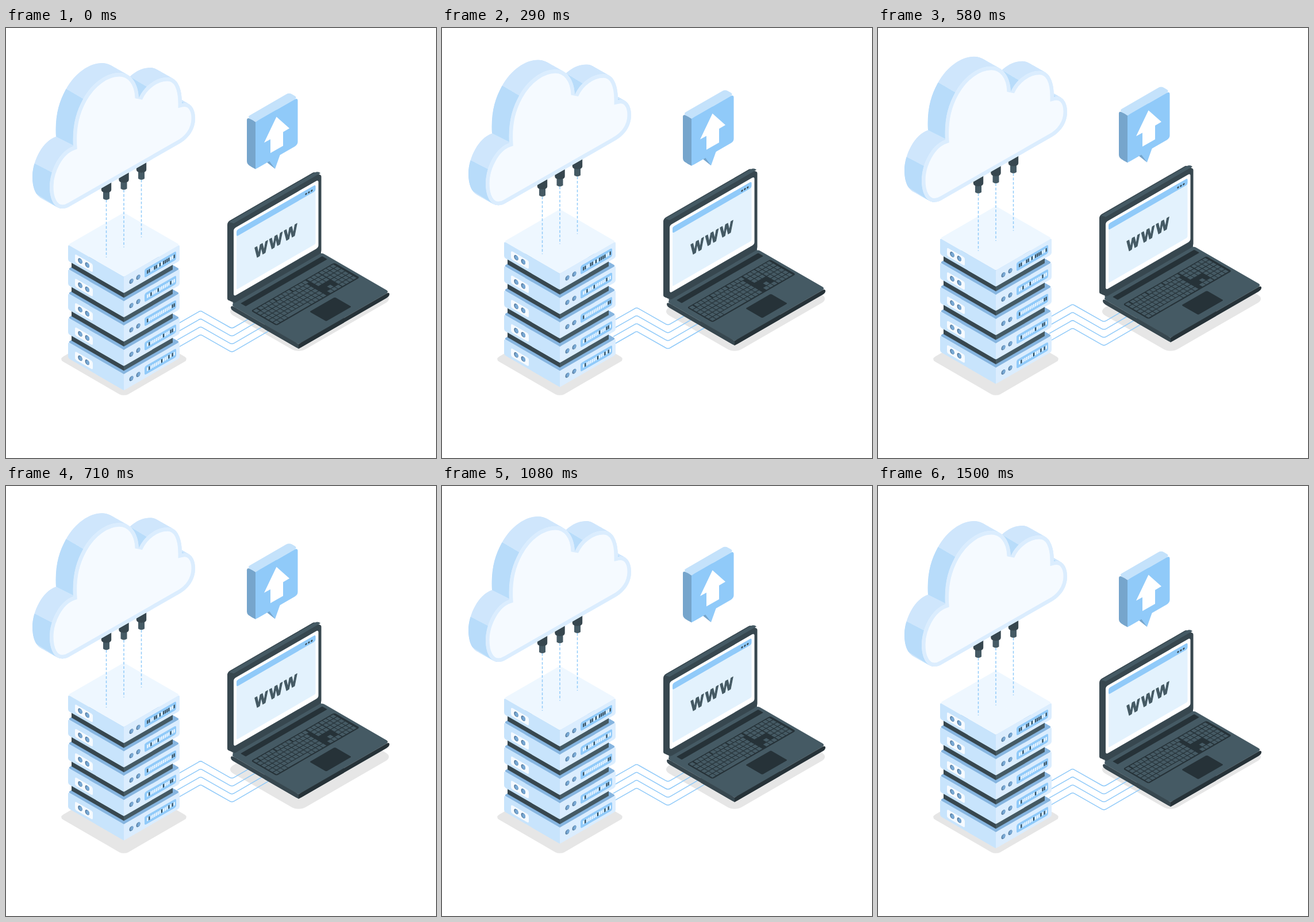
Write an HTML page that moves like this. It is 748x748 px and loops after 1.54 s.

```html
<!DOCTYPE html>
<html lang="en">
<head>
<meta charset="utf-8">
<title>Cloud hosting</title>
<style>
  html, body { margin: 0; width: 100%; height: 100%; overflow: hidden; background: #fff; }
  svg { display: block; width: 100%; height: 100%; }
</style>
</head>
<body>
<svg id="stage" viewBox="0 0 748 748"></svg>
<script>
const LOOP = 1540, STEPS = 37, FPS = 24;
const FLOAT = 1500, LIFT = 14.5;
const ISO = Math.tan(Math.PI / 6);
const BLUE = '#90caf9', INK = '#263238', DARK = '#37474f', SLATE = '#455a64', PALE = '#f5faff';

const repeat = (n, fn) => Array.from({ length: n }, (_, i) => fn(i)).join('');
const move = (x, y, body) => `<g transform="translate(${x} ${y})">${body}</g>`;
const rect = (x, y, w, h, fill, r = 0) =>
  `<rect x="${x}" y="${y}" width="${w}" height="${h}" rx="${r}" fill="${fill}"/>`;
const path = (d, fill, extra = '') => `<path d="${d}" fill="${fill}" ${extra}/>`;
const line = (d, extra = '') => path(d, 'none', `stroke="${BLUE}" stroke-width="1.5" ${extra}`);

// The three isometric planes, each with its origin at the plane's left corner.
const plane = (a, b, c, d) => (x, y, body) =>
  `<g transform="matrix(${a} ${b} ${c} ${d} ${x} ${y})">${body}</g>`;
const leftSide = plane(1, ISO, 0, 1);
const rightSide = plane(1, -ISO, 0, 1);
const floor = plane(1, -ISO, 1, ISO);

// Block whose front top corner is x,y; a and b are its widths to the left and right.
function box(x, y, a, b, h, colors, r) {
  const [top, left, right] = colors, lx = x - a, ly = y - a * ISO;
  return floor(lx, ly, rect(0, 0, b, a, top, r) + rect(0, a / 2, b / 2, a / 2, top)) +
    leftSide(lx, ly, rect(0, 0, a, h, left, r) + rect(a / 2, 0, a / 2, h, left)) +
    rightSide(x, y, rect(0, 0, b, h, right, r) + rect(0, 0, b / 2, h, right));
}

// Repeatable pseudo-random number from 0 to 1.
const noise = n => Math.abs(Math.sin(n * 127.1 + 3) * 4375.85) % 1;

function shadows() {
  return floor(91.5, 576, rect(0, 0, 113.5, 113.5, '#e6e6e6', 8)) +
    floor(383, 493, rect(0, 0, 164, 126, '#e6e6e6', 12));
}

function cloud() {
  const face = 'M98 314C84 314 76 298 76 276C76 249 93 214 117 206C115 170 122 146 134 124' +
    'C150 95 175 78 197 78C216 78 230 94 231 122C240 102 260 86 281 86C298 86 306 104 306 131' +
    'C319 128 329 138 329 157C329 177 317 193 300 202L112 309.5Q105 314 98 314Z';
  const body = repeat(61, i => move(-i / 2, -i * 0.283, path(face, 'currentColor')));
  return `<defs>
      <clipPath id="rim">${path(face, '#000')}</clipPath>
      <clipPath id="shade">
        <path d="M70 86L150 133L140 215L86 188H70ZM40 231L90 257L100 318L40 280Z
          M217 86L262 113L232 135ZM290 118L318 137L306 142Z"/>
      </clipPath>
      <g id="body">${body}</g>
    </defs>
    <use href="#body" color="#cfe6fc"/>
    <g clip-path="url(#shade)"><use href="#body" color="#b8dcfa"/></g>` +
    path(face, PALE, 'stroke="#dbedfe" stroke-width="13" clip-path="url(#rim)"');
}

function cable(i) {
  const x = 174.5 + i * 30.5, y = 299 - i * 17.5;
  return line(`M${x} ${y}v100`, 'stroke-dasharray="4.6 3"') +
    move(x, y,
      path('M-5.500 -16v14q5.500 4 11 0v-14z', SLATE) +
      path('M-8.700 -40v22q0 3 3.200 4.500q5.500 2 11 0q3.200 -1.500 3.200 -4.500v-22z', DARK));
}

function knob(x, y, r) {
  return `<ellipse cx="${x}" cy="${y}" rx="${r * 0.87}" ry="${r}" fill="#547ba0"/>
    <ellipse cx="${x + 0.8}" cy="${y}" rx="${r * 0.66}" ry="${r * 0.82}" fill="#78a9d5"/>`;
}

function server(i) {
  const colors = [i ? '#86b5e0' : '#eef7ff', '#c8e4fc', '#dbedfe'];
  const lights = repeat(16, n => {
    const lit = noise(i * 16 + n) > (i ? 0.25 : 0.6);
    return rect(40.2 + n * 3.1, 12, 2, 6, lit ? PALE : DARK);
  });
  // the dark spacer stands on the roof of every unit but the topmost
  const spacer = leftSide(114, 361.5, rect(0, 0, 91, 13, DARK)) +
    rightSide(205, 414, rect(0, 0, 85, 13, SLATE));
  return move(0, i * 42.3,
    box(205, 433, 97, 97, 28, colors, 3) +
    (i ? spacer : '') +
    leftSide(108, 377, rect(12, 9, 31, 14.5, PALE, 3) + knob(21, 16, 4.3) + knob(33.3, 16, 4.3)) +
    rightSide(205, 433, knob(13, 15, 4) + knob(25, 15, 4) + rect(36, 7.5, 55, 15, BLUE, 3) + lights));
}

function wires() {
  return repeat(4, i => move(0, i * 13.8,
    line('M298 515L334 494.500Q338 491 342 493.800L389 520.500Q393 523 397 520.500L458 485')));
}

// Keys lie on a grid of 21 by 6 cells: letters, arrows, number pad.
function keyboard() {
  const cellW = 6.75, cellH = 7;
  const key = (col, row, span = 1) =>
    rect(col * cellW + 0.5, row * cellH + 0.6, span * cellW - 1, cellH - 1.2, SLATE);
  const row = r => {
    const gap = r ? 0 : 0.2;
    const letters = r < 5
      ? repeat(13, c => key(0.1 + c + gap * Math.ceil(c / 4), r))
      : repeat(3, c => key(0.1 + c, r)) + key(3.1, r, 6) + repeat(4, c => key(9.1 + c, r));
    const arrows = repeat(3, c => r < 3 || r === 5 || (r === 4 && c === 1) ? key(14 + c, r) : '');
    const pad = repeat(4, c => key(17.1 + c * 0.95, r, 0.95));
    return letters + arrows + pad;
  };
  return rect(-1, -1, 145, 44.5, INK, 3) + repeat(6, row);
}

function lid() {
  const slab = repeat(11, i => rightSide(385 + i, 337.5 + i * 0.45, rect(0, 0, 153.5, 138, DARK, 5)));
  const edge = path('M388 337.500L537 251.500Q543 248.500 547 252.500L396 340Z', SLATE);
  const dots = repeat(3, i => `<circle cx="${127 + i * 4.9}" cy="20" r="1.6" fill="${DARK}"/>`);
  const label = `<text transform="translate(38 81) scale(.866 1)" fill="${SLATE}" stroke="${SLATE}"
    stroke-width="1.6" stroke-linejoin="round" letter-spacing="4" font-size="27" font-weight="700"
    font-family="'Liberation Sans', Arial, sans-serif">WWW</text>`;
  return slab + edge + rightSide(395, 342,
    rect(1, 7.6, 147.5, 118, '#fff', 4) + rect(6, 14, 137.5, 102.5, '#e3f2fd', 2) +
    rect(6, 13.3, 137.5, 11, BLUE, 3) + dots + label);
}

function laptop() {
  return box(509, 550, 118, 158, 8, [SLATE, DARK, INK], 5) +
    path('M394 478L548 388V400L400 488Z', SLATE) +
    floor(408, 479, rect(0, 0, 142, 9, INK, 1)) +
    floor(428, 492, keyboard()) +
    floor(528, 493.5, rect(0, 0, 44, 29, INK, 2)) +
    lid();
}

function bubble() {
  return path('M453 233L460 228L468 245Z', '#76a5cc') +
    path('M457 230L478 217L468 245Z', BLUE) +
    box(434, 163.5, 15, 73.5, 82, ['#c4e2fb', '#76a5cc', BLUE], 5) +
    path('M470.500 154.500L493 174.500L482 181V205L460 217.500V193.500L449 199.500Z', '#fff');
}

const stage = document.getElementById('stage');
stage.innerHTML = shadows() + '<g id="scene">' + wires() + repeat(5, i => server(4 - i)) +
  repeat(3, cable) + cloud() + laptop() + bubble() + '</g>';
const scene = document.getElementById('scene');

function draw(ms) {
  const step = Math.floor(((ms % LOOP) + 5) / LOOP * STEPS) % STEPS;
  const phase = step * 1000 / FPS / FLOAT;
  const y = LIFT * (1 - Math.abs(1 - 2 * phase));
  scene.setAttribute('transform', `translate(0 ${(-y).toFixed(3)})`);
}

const start = performance.now();
function tick() {
  draw(performance.now() - start);
  requestAnimationFrame(tick);
}
draw(0);
requestAnimationFrame(tick);
</script>
</body>
</html>
```
